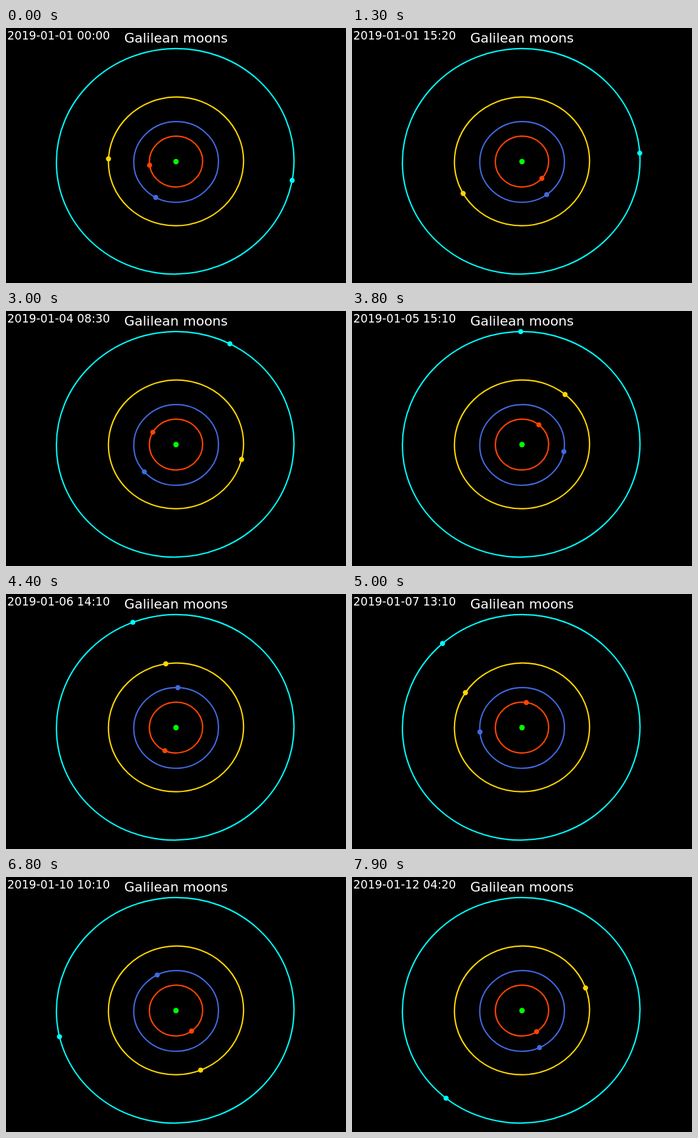
Recreate the animation shown at these times as an HTML page. Size 560 by 420 pixels, loop 8000 ms.

```html
<!DOCTYPE html>
<html lang="en">
<head>
<meta charset="utf-8">
<title>Galilean moons</title>
<style>
  html, body { margin: 0; width: 100%; height: 100%; overflow: hidden; background: #000; }
  svg { display: block; width: 100%; height: 100%; }
  text { font-family: "DejaVu Sans", Verdana, sans-serif; fill: #fff; }
</style>
</head>
<body>
<svg viewBox="0 0 560 420">
  <text id="clock" x="2" y="19.3" font-size="18.8"></text>
  <text x="280" y="23.5" font-size="22" text-anchor="middle">Galilean moons</text>
  <g id="orbits" fill="none" stroke-width="2.2"></g>
  <circle cx="280" cy="220" r="4.5" fill="#0f0"/>
  <g id="moons"></g>
</svg>
<script>
const LOOP = 8000, HOLD = 1000, STEP = 100;
const MINUTES_PER_STEP = 230;
const SKEW = 0.008; // slight tilt shared by all orbits, in radians
const RAD = Math.PI / 180;

// period in days; phase and periapsis in degrees
const moons = [
  { color: "#ff4500", cx: 280,   cy: 220,   rx: 43.9,  ry: 41.8,  period: 1.769138,  phase: 188,    ecc: 0.0045, peri: -60 },
  { color: "#4169e1", cx: 280.2, cy: 220.6, rx: 69.8,  ry: 66.4,  period: 3.551181,  phase: 240.95, ecc: 0.009,  peri: 95 },
  { color: "#ffd700", cx: 280,   cy: 219.7, rx: 111.3, ry: 106,   period: 7.154553,  phase: 177.3,  ecc: 0.0013, peri: 0 },
  { color: "#00ffff", cx: 278.7, cy: 219.6, rx: 195.7, ry: 185.7, period: 16.689018, phase: -10.1,  ecc: 0.0073, peri: 0 },
];

function addCircle(parentId, attributes) {
  const circle = document.createElementNS("http://www.w3.org/2000/svg", "circle");
  for (const name in attributes) circle.setAttribute(name, attributes[name]);
  return document.getElementById(parentId).appendChild(circle);
}

for (const moon of moons) {
  const { cx, cy, rx, ry, color } = moon;
  const matrix = [rx, -ry * Math.sin(SKEW), 0, -ry * Math.cos(SKEW), cx, cy];
  addCircle("orbits", {
    r: 1, stroke: color, transform: `matrix(${matrix})`, "vector-effect": "non-scaling-stroke",
  });
  moon.dot = addCircle("moons", { r: 4.2, fill: color });
}

function placeMoon(moon, minutes) {
  const mean = moon.phase * RAD + 2 * Math.PI * minutes / (moon.period * 1440);
  const angle = mean + moon.ecc * Math.sin(mean - moon.peri * RAD);
  moon.dot.setAttribute("cx", moon.cx + moon.rx * Math.cos(angle));
  moon.dot.setAttribute("cy", moon.cy - moon.ry * Math.sin(angle + SKEW));
}

const clock = document.getElementById("clock");
const startDate = Date.UTC(2019, 0, 1);

function draw(now) {
  const time = now % LOOP;
  const step = time < HOLD ? 0 : Math.floor((time - HOLD) / STEP) + 1;
  const minutes = step * MINUTES_PER_STEP;
  clock.textContent = new Date(startDate + minutes * 60000).toISOString().slice(0, 16).replace("T", " ");
  for (const moon of moons) placeMoon(moon, minutes);
}

let start;
function tick(now) {
  start ??= now;
  draw(now - start);
  requestAnimationFrame(tick);
}
draw(0);
requestAnimationFrame(tick);
</script>
</body>
</html>
```
